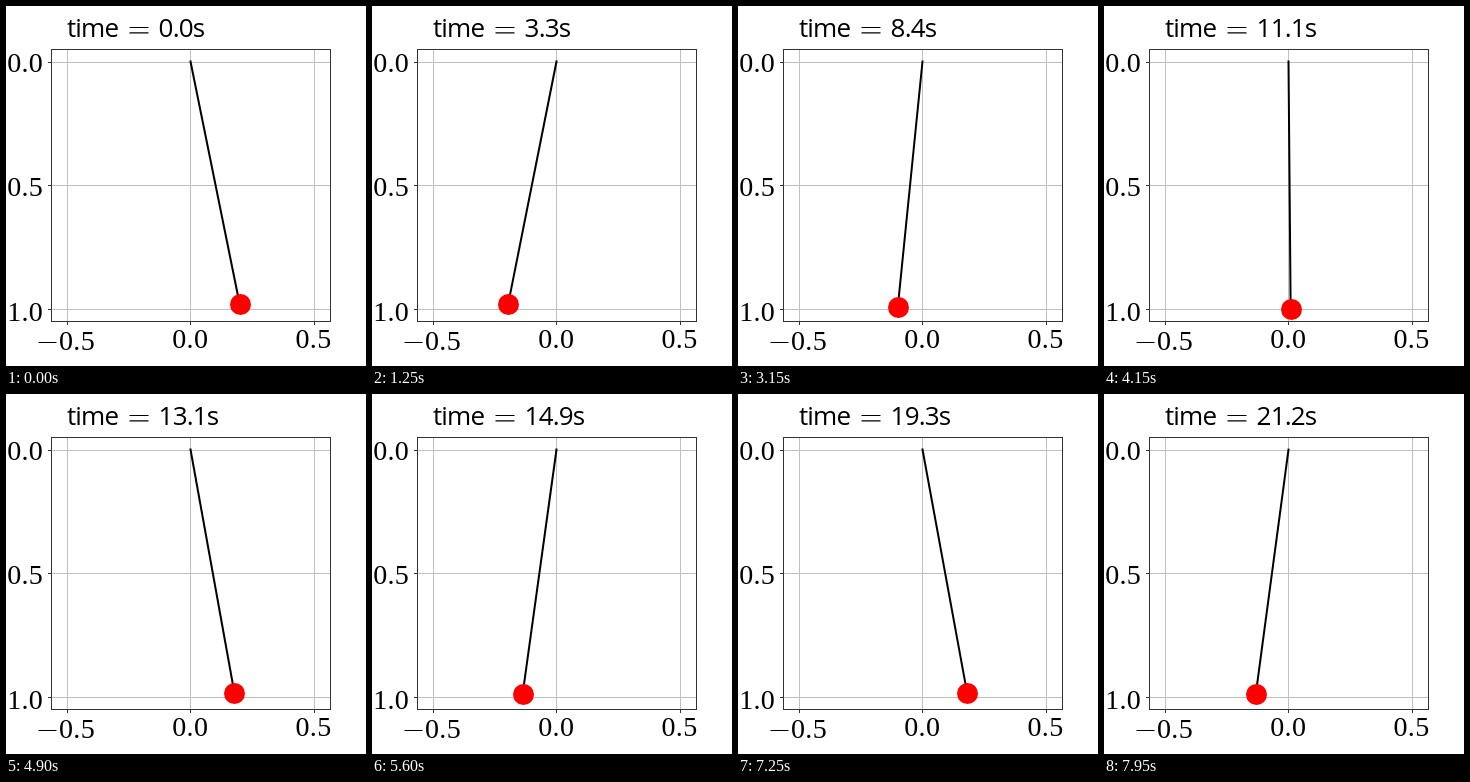
These frames come from a looping animation (360x360 px, 8000 ms). An HTML page:

```html
<!DOCTYPE html>
<html lang="en">
<head>
<meta charset="utf-8">
<title>Pendulum</title>
<style>
  html, body { margin: 0; width: 100%; height: 100%; overflow: hidden; background: #fff; }
  svg { display: block; width: 100vw; height: 100vh; }
  .title { font: 26px "Open Sans", sans-serif; letter-spacing: -.83px; }
  .tick { font: 28px "Liberation Serif", serif; letter-spacing: .35px; }
  .grid { stroke: #c0c0c0; fill: none; }
  .axis { stroke: #333; fill: none; }
  .sign { stroke: #000; stroke-width: 1.2; }
</style>
</head>
<body>
<svg viewBox="0 0 360 360">
  <path class="grid" d="M61.5 43.5V315.5M184.5 43.5V315.5M308.5 43.5V315.5M45.5 56.5H324.5M45.5 179.5H324.5M45.5 303.5H324.5"/>
  <path class="axis" d="M61.5 316V319M184.5 316V319M308.5 316V319M45 56.5H42M45 179.5H42M45 303.5H42"/>

  <line id="rod" stroke="#000" stroke-width="2" stroke-linecap="square"/>
  <circle id="bob" r="10.5" fill="#f00"/>
  <rect class="axis" x="45.5" y="43.5" width="279" height="272"/>

  <g class="tick" text-anchor="end">
    <text x="37.2" y="66">0.0</text>
    <text x="37.2" y="189.5">0.5</text>
    <text x="37.2" y="315">1.0</text>
  </g>
  <g class="tick" text-anchor="middle">
    <text x="71" y="343.5">0.5</text>
    <text x="184.3" y="342.3">0.0</text>
    <text x="307.5" y="342.3">0.5</text>
  </g>
  <path class="sign" d="M32.5 336.5H50.5M123.5 21.5H142.5M123.5 26.8H142.5"/>

  <text class="title" x="61" y="31">time</text>
  <text class="title" id="clock" x="152.6" y="31"></text>
</svg>
<script>
  const LOOP = 8000, STEP = 50;      // ms
  const DT = 2 / 15;                 // simulated seconds per step
  const AMP = 0.2;                   // rad
  const OMEGA = 1 - AMP * AMP / 16;  // finite-amplitude correction
  const PX = 184.5, PY = 55.5, LEN = 247.15;

  const rod = document.getElementById('rod');
  const bob = document.getElementById('bob');
  const clock = document.getElementById('clock');

  function set(el, attrs) {
    for (const key in attrs) el.setAttribute(key, attrs[key]);
  }

  // The bob sits on whole pixels, the rod does not.
  const snap = v => Math.round(v) + 0.5;

  function draw(ms) {
    const t = Math.floor(ms % LOOP / STEP) * DT;
    const angle = AMP * Math.cos(OMEGA * t);
    const x = PX + LEN * Math.sin(angle);
    const y = PY + LEN * Math.cos(angle);
    set(rod, { x1: PX, y1: PY, x2: x, y2: y });
    set(bob, { cx: snap(x), cy: snap(y) });
    clock.textContent = t.toFixed(1) + 's';
  }

  const start = performance.now();
  function tick() {
    draw(performance.now() - start);
    requestAnimationFrame(tick);
  }
  tick();
</script>
</body>
</html>
```
